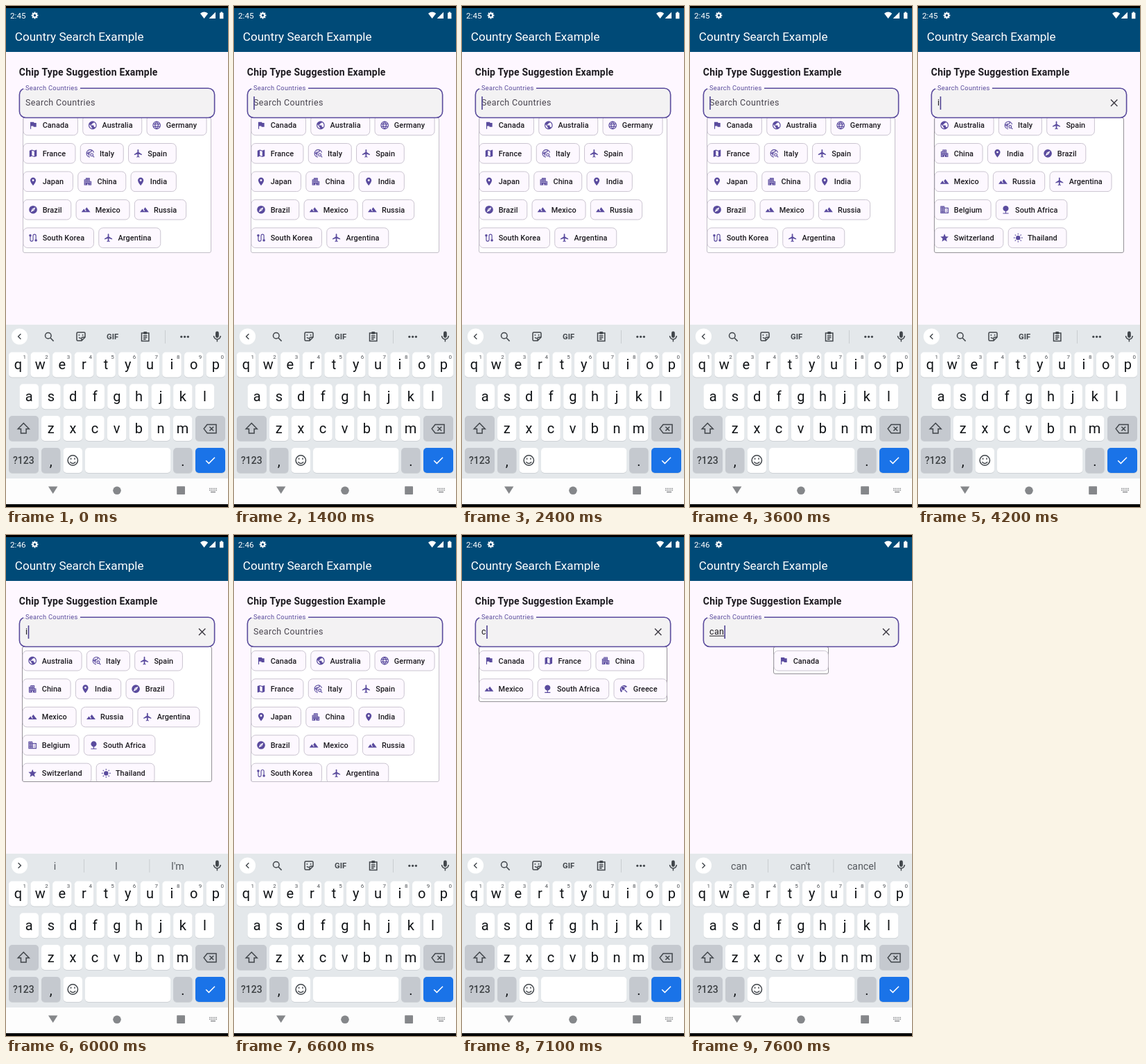
Recreate the animation shown at these times as an HTML page. Size 320 by 720 pixels, loop 8000 ms.

```html
<!DOCTYPE html>
<html lang="en">
<head>
<meta charset="utf-8">
<title>Country Search Example</title>
<style>
html, body { margin: 0; width: 100%; height: 100%; overflow: hidden; background: #fef7ff; }
svg { display: block; width: 320px; height: 720px; }
text { font-family: Roboto, Arial, sans-serif; white-space: pre; }
.mid { text-anchor: middle; }
.chip text { font-size: 10.9px; font-weight: 500; letter-spacing: .08px; fill: #1d1b20; }
.chip rect { fill: #fdf8ff; stroke: #cac4d0; stroke-width: 1; }
.field { font-size: 12.44px; letter-spacing: .39px; }
.key { font-size: 20px; fill: #111417; text-anchor: middle; }
.hint { font-size: 8px; fill: #4d5156; text-anchor: middle; }
.cand { font-size: 14.3px; fill: #55595e; text-anchor: middle; }
.line { fill: none; stroke: #41464b; stroke-width: 1.5; }
</style>
</head>
<body>
<svg viewBox="0 0 320 720">
  <defs><clipPath id="clip"><rect id="clipBox" y="161"/></clipPath></defs>
  <rect width="320" height="720" fill="#fef7ff"/>
  <rect width="320" height="66" fill="#004a77"/>
  <g id="status" fill="#fff"></g>
  <text x="12.8" y="50" font-size="17.1" fill="#fff">Country Search Example</text>
  <text x="18.8" y="99.5" font-size="14" font-weight="700" letter-spacing=".19" fill="#1d1b20">Chip Type Suggestion Example</text>

  <rect id="box" y="160.5" rx="2.5" fill="#fff" stroke-width="1"/>
  <g id="chips" clip-path="url(#clip)"></g>

  <rect x="19.4" y="118.3" width="281.2" height="42.2" rx="9" fill="#f3f2f3" stroke="#594a9c" stroke-width="1.6"/>
  <rect x="25" y="116" width="82" height="3.2" fill="#fef7ff"/>
  <text x="28" y="121.4" font-size="9.33" letter-spacing=".29" fill="#594a9c">Search Countries</text>
  <text id="typed" class="field" x="28" y="143.2"></text>
  <rect id="under" x="28" y="144.6" height="1" fill="#1d1b20"/>
  <rect id="caret" y="130" width="1.6" height="19" fill="#4f4292"/>
  <path id="clear" d="M278 134.5l9.4 9.4m0-9.4l-9.4 9.4" fill="none" stroke="#3c3942" stroke-width="1.4"/>

  <rect y="458" width="320" height="221" fill="#e4e8eb"/>
  <g id="keys"></g>
  <circle cx="19.5" cy="475" r="11.6" fill="#fff"/>
  <path id="chevron" fill="none" stroke="#41464b" stroke-width="1.4"/>
  <g id="tools"></g>
  <g id="cands"></g>
  <g fill="#41464b">
    <rect x="302" y="467.5" width="4.8" height="9.5" rx="2.4"/>
    <path class="line" d="M299.5 474a4.9 4.9 0 009.8 0M304.4 479v3.5"/>
  </g>

  <rect y="679" width="320" height="41" fill="#fdfdfd"/>
  <g fill="#85878a">
    <path d="M61 690.5h13.4l-6.7 10.5z"/>
    <circle cx="160" cy="696.3" r="5.8"/>
    <rect x="246.2" y="690.3" width="11.8" height="11.8" rx=".8"/>
    <g id="switcher"></g>
  </g>
  <path d="M0 0h320v3H0zM0 716h320v4H0z"/>
</svg>
<script>
const $ = id => document.getElementById(id);
const rect = (x, y, w, h, r, fill) =>
  `<rect x="${x}" y="${y}" width="${w}" height="${h}" rx="${r}" fill="${fill}"/>`;
const label = (cls, x, y, s) => `<text class="${cls}" x="${x}" y="${y}">${s}</text>`;
const stroke = (d, w = 2) => `<path d="${d}" fill="none" stroke="currentColor" stroke-width="${w}"/>`;
const solid = d => `<path fill-rule="evenodd" d="${d}"/>`;
const disc = (x, y, r) => `<circle cx="${x}" cy="${y}" r="${r}"/>`;
const ring = (x, y, r, w = 2) =>
  `<circle cx="${x}" cy="${y}" r="${r}" fill="none" stroke="currentColor" stroke-width="${w}"/>`;
const spokes = (n, a, b) => Array.from({ length: n }, (_, i) => {
  const q = i * 2 * Math.PI / n, c = Math.cos(q), s = Math.sin(q);
  return `M${12 + a * c} ${12 + a * s}L${12 + b * c} ${12 + b * s}`;
}).join('');
// Square windows cut into a building, listed as x,y pairs
const windows = s => s.split(' ').map(p => `M${p}h2v2h-2z`).join('');

const icons = {
  flag: solid('M14.4 6L14 4H5v17h2v-7h5.6l.4 2h7V6z'),
  globe: solid('M12 2C6.48 2 2 6.48 2 12s4.48 10 10 10 10-4.48 10-10S17.52 2 12 2zm-1 17.93c-3.95-.49-7-3.85-7-7.93 0-.62.08-1.21.21-1.79L9 15v1c0 1.1.9 2 2 2v1.93zm6.9-2.54c-.26-.81-1-1.39-1.9-1.39h-1v-3c0-.55-.45-1-1-1H8v-2h2c.55 0 1-.45 1-1V7h2c1.1 0 2-.9 2-2v-.41c2.93 1.19 5 4.06 5 7.41 0 2.08-.8 3.97-2.1 5.39z'),
  web: ring(12, 12, 9) + stroke('M4 9h16M4 15h16M12 3q-8 9 0 18q8-9 0-18'),
  map: solid('M20.5 3L15 5.1 9 3 3.4 4.9 3 5.4V20.5l.6.5L9 18.9l6 2.1 5.6-1.9.4-.5V3.5zM15 19l-6-2.1V5l6 2.1z'),
  explore: stroke('M20.8 10A9 9 0 1011 21M15 4v3l-3 2H8v3h3M4 10l5 5v3') + ring(16, 15.5, 3.2) + stroke('M18.5 18l3.5 3.5'),
  plane: solid('M21 16v-2l-8-5V3.5c0-.83-.67-1.5-1.5-1.5S10 2.67 10 3.5V9l-8 5v2l8-2.5V19l-2 1.5V22l3.5-1 3.5 1v-1.5L13 19v-5.5z'),
  pin: solid('M12 2C8.13 2 5 5.13 5 9c0 5.25 7 13 7 13s7-7.75 7-13c0-3.87-3.13-7-7-7zm0 9.5a2.5 2.5 0 010-5 2.5 2.5 0 010 5z'),
  flats: solid('M17 11V3H7v4H3v14h8v-4h2v4h8V11z' + windows('5,9 5,13 5,17 9,5 9,9 9,13 13,5 13,9 13,13 17,13 17,17')),
  compass: solid('M12 2a10 10 0 100 20 10 10 0 000-20zM14.2 14.2L6 18l3.8-8.2L18 6z') + disc(12, 12, 1.1),
  peaks: solid('M14 6l-3.75 5 2.85 3.8-1.6 1.2C9.81 13.75 7 10 7 10l-6 8h22z'),
  route: stroke('M5 8v9a3.5 3.5 0 007 0V7a3.5 3.5 0 017 0v9') + disc(5, 6, 3) + disc(19, 18, 3),
  office: solid('M12 7V3H2v18h20V7zM12 9h8v10h-8z' + windows('4,5 4,9 4,13 4,17 8,5 8,9 8,13 8,17')) + solid(windows('12,11 12,15 16,11 16,15')),
  tree: solid('M13 16.1a7 7 0 10-2 0V20H5v2h14v-2h-6z'),
  star: solid('M12 17.27L18.18 21l-1.64-7.03L22 9.24l-7.19-.61L12 2 9.19 8.63 2 9.24l5.46 4.73L5.82 21z'),
  sun: disc(12, 12, 5.5) + stroke(spokes(8, 8, 11)),
  leaf: solid('M6.05 8.05c-2.73 2.73-2.73 7.15-.02 9.88 1.47-3.4 4.09-6.24 7.36-7.93-2.77 2.34-4.71 5.61-5.39 9.32 2.6 1.23 5.8.78 7.95-1.37C19.43 14.47 20 4 20 4S9.53 4.57 6.05 8.05z'),
  bat: stroke('M3.5 4.5L13 14', 5) + stroke('M13 14l7.5 7.5', 2.6) + disc(18.5, 5.5, 3),
  coin: disc(12, 12, 10) + '<path d="M15 9q-.5-2-3-2t-3 2.3 3 2.7 3 2.7-3 2.3-3-2M12 5v14" fill="none" stroke="#fff" stroke-width="1.8"/>',
  beach: solid('M13.13 14.56l1.43-1.43L21 19.57 19.57 21zM17.42 8.83l2.86-2.86c-3.95-3.95-10.35-3.96-14.3-.02 3.93-1.3 8.31-.25 11.44 2.88zM5.95 5.98c-3.94 3.95-3.93 10.35.02 14.3l2.86-2.86C5.7 14.29 4.65 9.91 5.95 5.98zM5.96 5.97c-.38 3.01 1.17 6.88 4.3 10.02l5.73-5.73c-3.13-3.13-7.01-4.68-10.03-4.29z')
};

const countries = [
  ['Canada', 'flag', 79.5], ['Australia', 'globe', 86], ['Germany', 'web', 87],
  ['France', 'map', 76], ['Italy', 'explore', 63], ['Spain', 'plane', 69.7],
  ['Japan', 'pin', 72.5], ['China', 'flats', 70], ['India', 'pin', 66.3],
  ['Brazil', 'compass', 69.8], ['Mexico', 'peaks', 78], ['Russia', 'peaks', 75.3],
  ['South Korea', 'route', 102.5], ['Argentina', 'plane', 90], ['Belgium', 'office', 82],
  ['South Africa', 'tree', 103.5], ['Switzerland', 'star', 99.8], ['Thailand', 'sun', 84.8],
  ['Singapore', 'leaf', 92], ['Finland', 'bat', 78.3], ['Greece', 'beach', 77.5],
  ['Indonesia', 'coin', 90.3]
];
const GAP = 6.3, ROW = 40.44, FIT = 275;

function wrap(query) {
  const rows = [];
  let end = Infinity;
  for (const [name, icon, w] of countries.filter(c => c[0].toLowerCase().includes(query))) {
    if (end + GAP + w > FIT) { rows.push([]); end = -GAP; }
    rows[rows.length - 1].push({ name, icon, w, x: end + GAP });
    end += GAP + w;
  }
  return rows;
}

function chip(c, x, y) {
  return `<g class="chip" transform="translate(${x} ${y})">
    <rect x=".5" y="-14.3" width="${c.w - 1}" height="28.6" rx="6"/>
    <g transform="translate(7.6 -7) scale(.583)" fill="#5a4b9e" color="#5a4b9e">${icons[c.icon]}</g>
    <text x="28.2" y="3.9">${c.name}</text></g>`;
}

function set(id, attrs) {
  for (const k in attrs) $(id).setAttribute(k, attrs[k]);
}

function showList(query, scroll) {
  const rows = wrap(query);
  const w = query ? Math.max(...rows.map(r => { const c = r[r.length - 1]; return c.x + c.w; })) : 271.5;
  const left = 160.2 - w / 2;
  const edge = Math.round(left - .8) + .5;
  const bottom = Math.min(354.5, Math.round(199 + (rows.length - 1) * ROW) + .5);
  const size = { x: edge, width: 320 - 2 * edge, height: bottom - 160.5 };
  set('box', { ...size, stroke: query ? '#949297' : '#c3bfc8' });
  set('clipBox', { ...size, height: bottom - 161.4 });
  $('chips').innerHTML = rows.map((r, i) =>
    r.map(c => chip(c, left + c.x, 180.7 + i * ROW - scroll)).join('')).join('');
}

const caretX = { '': 28.2, i: 31.7, in: 39.2, c: 35.2, ca: 42.2, can: 49.4 };
const words = {
  i: ['i', 'I', 'I\'m'], in: ['in', 'I\'m', 'on'], c: ['c', 'C', 'can'],
  ca: ['ca', 'can', 'car'], can: ['can', 'can\'t', 'cancel']
};

// time, text, caret, list scroll, word suggestions, minute
const steps = [
  [0, '', 0, 9.3, '', 45], [400, '', 1, 9.3, '', 45], [900, '', 0, 9.3, '', 45],
  [1400, '', 1, 9.3, '', 45], [1900, '', 0, 9.3, '', 45], [2400, '', 1, 9.3, '', 45],
  [2900, '', 0, 9.3, '', 45], [3400, '', 1, 9.3, '', 45], [3900, '', 0, 9.3, '', 45],
  [4200, 'i', 1, 9.3, '', 45], [4300, 'i', 1, 9.3, 'i', 45], [4400, 'in', 1, 0, 'i', 45],
  [4500, 'in', 1, 0, 'in', 46], [5000, 'in', 0, 0, 'in', 46], [5500, 'in', 1, 0, 'in', 46],
  [6000, 'i', 1, 0, 'i', 46], [6100, '', 1, 0, 'i', 46], [6200, '', 1, 0, '', 46],
  [6600, '', 0, 0, '', 46], [7100, 'c', 1, 0, '', 46], [7200, 'c', 1, 0, 'c', 46],
  [7300, 'ca', 1, 0, 'c', 46], [7400, 'ca', 1, 0, 'ca', 46], [7600, 'can', 1, 0, 'can', 46]
];

function show([, text, caret, scroll, hint, minute]) {
  showList(text, scroll);
  $('typed').textContent = text || 'Search Countries';
  set('typed', { fill: text ? '#1d1b20' : '#49454f' });
  set('under', { width: text.length > 1 ? caretX[text] - 28 : 0 });
  set('caret', { x: caretX[text], opacity: caret });
  set('clear', { opacity: text ? 1 : 0 });
  set('chevron', { d: hint ? 'M17.6 471.2l3.8 3.8-3.8 3.8' : 'M21.4 471.2l-3.8 3.8 3.8 3.8' });
  set('tools', { display: hint ? 'none' : 'inline' });
  $('cands').innerHTML = hint
    ? words[hint].map((s, i) => label('cand', 70.5 + i * 88.5, 481, s)).join('') +
      rect(112, 466, .8, 19, 0, '#c3c7cb') + rect(206.5, 466, .8, 19, 0, '#c3c7cb')
    : '';
  $('clock').textContent = '2:' + minute;
}

function buildStatus() {
  const gear = `<g transform="translate(35.5 7.5) scale(.5)" color="#fff">${ring(12, 12, 5.2, 3.8)}${stroke(spokes(8, 6, 9.8), 4)}</g>`;
  $('status').innerHTML = '<text id="clock" x="6" y="18" font-size="11.7"></text>' + gear +
    '<path d="M280 10.7q5.6-4.4 11.2 0l-5.6 7.4z"/><path d="M302 8.7v9.4h-9.4z"/>' +
    '<path d="M308 9.7h1.5v-1.2h2.4v1.2h1.5v8.6H308z"/>';
}

function buildKeys() {
  const dark = '#c5c9cf', pitch = 31.65;
  const key = (x, y, w, fill) => rect(x, y + 1, w, 36, 5, '#ced2d6') + rect(x, y, w, 36, 5, fill);
  let s = '';
  [['qwertyuiop', 17.5, 497.5], ['asdfghjkl', 33.3, 543.3], ['zxcvbnm', 64.7, 589]].forEach(([row, x0, y], r) =>
    [...row].forEach((ch, i) => {
      const x = x0 + i * pitch;
      s += key(x - 13.7, y, 27.4, '#fff') + label('key', x, y + 24.5, ch);
      if (!r) s += label('hint', x + 9.3, y + 9, (i + 1) % 10);
    }));
  const wide = [[4, 589, 43, dark], [273, 589, 43, dark], [4, 635, 43, dark], [51, 635, 27.4, dark],
    [82.6, 635, 27.4, '#fff'], [114, 635, 123.4, '#fff'], [241.2, 635, 27.4, dark], [273, 635, 43, '#1a73e8']];
  for (const k of wide) s += key(...k);
  s += '<text class="mid" x="25.4" y="658" font-size="14" font-weight="500" fill="#3c4043">?123</text>' +
    label('key', 64.8, 661, ',') + label('key', 255, 661, '.') +
    '<g class="line"><path d="M25.3 599.5l8 8.2h-4.2v6.3h-7.6v-6.3h-4.2z"/>' +
    '<path d="M290 601.5h13v12.2h-13l-4.8-6.1zM293.4 604.7l5.8 5.8m0-5.8l-5.8 5.8"/>' +
    '<circle cx="96.3" cy="653" r="7.2"/><path d="M92.4 655.2q3.9 4.4 7.8 0M93.6 649.4v2.4M99 649.4v2.4"/>' +
    '<path d="M288.2 653.2l4.2 4.2 8.6-8.6" stroke="#fff"/></g>';
  $('keys').innerHTML = s;
}

function buildTools() {
  $('tools').innerHTML = '<g class="line"><circle cx="60.8" cy="473.8" r="4.3"/><path d="M64 477l4.6 4.6"/>' +
    '<path d="M114 476v-5.5q0-1.5-1.5-1.5h-9q-1.5 0-1.5 1.5v9q0 1.5 1.5 1.5h5.5zM114 476h-3.5q-1.5 0-1.5 1.5v3.5M105.4 472v1.8M110.6 472v1.8M105 476.2q1.2 1.4 3 1.2"/>' +
    '<path d="M195.5 470h10.4v11.6h-10.4zM198.3 470.5h4.8M198 474h5.4M198 476.4h5.4M198 478.8h3.6"/></g>' +
    '<rect x="198.2" y="468" width="5" height="3.4" rx="1" fill="#41464b"/>' +
    '<text class="mid" x="153.6" y="479" font-size="11.2" font-weight="700" fill="#41464b">GIF</text>' +
    rect(229, 466, .8, 19, 0, '#c3c7cb') +
    [252.8, 257.6, 262.4].map(x => `<circle cx="${x}" cy="475.3" r="1.6" fill="#41464b"/>`).join('');
  let dots = '';
  for (let i = 0; i < 10; i++) dots += rect(293 + i % 5 * 2.4, 692.8 + Math.floor(i / 5) * 2.4, 1.4, 1.4, 0, '#85878a');
  $('switcher').innerHTML = dots + rect(295, 697.8, 7, 1.4, 0, '#85878a');
}

buildStatus();
buildKeys();
buildTools();

let current;
function tick() {
  const t = performance.now() % 8000;
  const step = steps.filter(s => s[0] <= t).pop();
  if (step !== current) show(current = step);
  requestAnimationFrame(tick);
}
tick();
</script>
</body>
</html>
```
